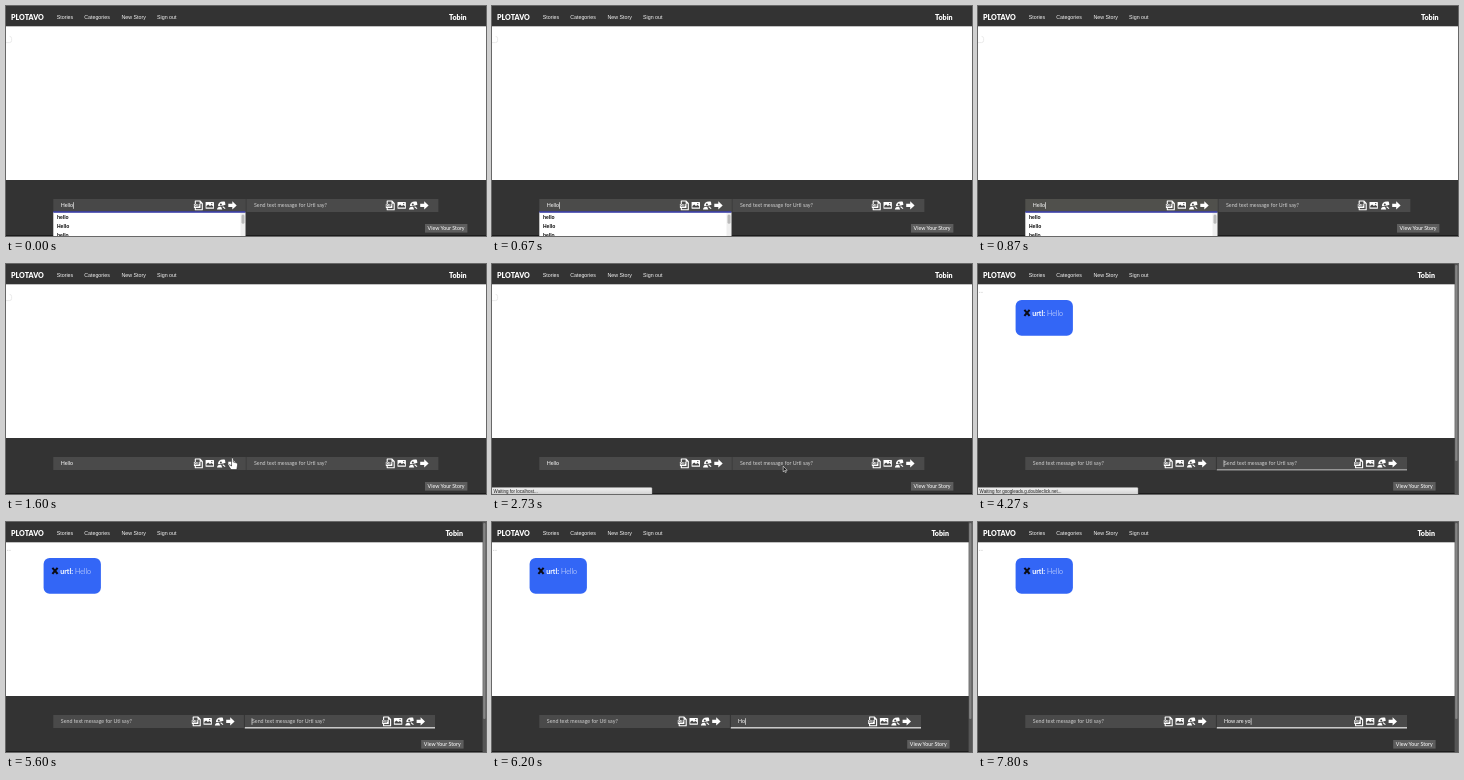
An HTML page that plays this animation: 480x230 px, repeating every 8 s.

```html
<!DOCTYPE html>
<html lang="en">
<head>
<meta charset="utf-8">
<title>Chat story</title>
<style>
html, body { margin: 0; width: 100%; height: 100%; overflow: hidden; background: #fff; }
svg { display: block; width: 480px; height: 230px; }
text { white-space: pre; }
.sans { font-family: "Liberation Sans", Arial, sans-serif; }
.lato { font-family: Lato, sans-serif; }
.nav { font-size: 5.3px; fill: #f4f4f4; }
.heavy { font-size: 7.1px; font-weight: 900; fill: #fff; }
.field { font-size: 5.3px; }
.row { font-size: 5px; font-weight: 700; fill: #111; }
</style>
</head>
<body>
<svg id="stage" viewBox="0 0 480 230" xmlns="http://www.w3.org/2000/svg">
  <defs>
    <linearGradient id="bar" x2="0" y2="1">
      <stop stop-color="#f2f2f2"/><stop offset="1" stop-color="#d0d0d0"/>
    </linearGradient>
    <g id="icons" fill="#fff">
      <path d="M-3-4.4H1.6L4-2V4.4H-3Z" fill="none" stroke="#fff" stroke-width="1.1" stroke-linejoin="round"/>
      <path d="M1.3-4.4V-1.7H4Z"/>
      <rect x="-4.4" y="-1.4" width="6.6" height="4" rx=".5"/>
      <text class="sans" x="-3.9" y="1.8" font-size="3.2" font-weight="700" fill="#333">GIF</text>
      <g transform="translate(11.5)">
        <rect x="-4.2" y="-3.4" width="8.4" height="6.8" rx=".6"/>
        <path d="M-3.4 2.2V.6L-1.6-1 .1.7 1.9-.4 3.4 1V2.2Z" fill="#444"/>
        <circle cx="2" cy="-1.8" r=".7" fill="#444"/>
      </g>
      <g transform="translate(23)">
        <path d="M-3.3.8C-3.4-2.5-1-4.3 3.6-3.7L4.2-.6 1.8.2Z"/>
        <path d="M-4.3 4.2C-4 1.5-2.4.9-.2 1.4L1 4.2Z"/>
        <circle cx="-.4" cy="-1" r="1" fill="#444"/>
        <path d="M1.4 1.2 3.8 3.2" stroke="#fff" stroke-width="1.2"/>
      </g>
      <path d="M30-1.6H34V-4.1L38.4 0 34 4.1V1.6H30Z"/>
    </g>
    <g id="list">
      <rect y="206" width="192" height="24" fill="#fff"/>
      <rect y="205.2" width="192" height="1.6" fill="#3b3fa8"/>
      <g class="sans row">
        <text x="3.7" y="213.4">hello</text>
        <text x="3.7" y="222.3">Hello</text>
        <text x="3.7" y="231.2">hello</text>
      </g>
      <rect x="187.2" y="207" width="4.8" height="23" fill="#efefef"/>
      <rect x="188.2" y="208.4" width="3" height="9.4" rx="1.5" fill="#b9b9b9"/>
    </g>
  </defs>

  <rect width="480" height="230" fill="#fff"/>
  <rect width="480" height="20.3" fill="#333"/>
  <rect y="174" width="480" height="56" fill="#333"/>
  <rect y="229" width="480" height="1" fill="#1c1c1c"/>
  <text class="lato heavy" x="5" y="13.8">PLOTAVO</text>
  <g class="sans nav">
    <text x="50.7" y="13.1">Stories</text>
    <text x="78.2" y="13.1">Categories</text>
    <text x="115.4" y="13.1">New Story</text>
    <text x="151" y="13.1">Sign out</text>
  </g>
  <text id="user" class="lato heavy" y="14">Tobin</text>

  <path id="box" d="M0 36.6H3.6Q5.6 36.6 5.6 34.6V32.4Q5.6 30.4 3.6 30.4" fill="none" stroke="#ddd" stroke-width=".6"/>
  <g id="bubble">
    <path d="M1 28.4H5" stroke="#bbb" stroke-width=".6" stroke-dasharray="1 .7"/>
    <rect x="37.6" y="36" width="57.3" height="35.8" rx="6" fill="#3366f6"/>
    <path d="M46.4 45.9 51.6 51.9M51.6 45.9 46.4 51.9" stroke="#0b0b14" stroke-width="2.1"/>
    <text class="lato" x="54.2" y="51.6" font-size="7.1" fill="#fff"><tspan font-weight="700">urtl:</tspan><tspan font-weight="300"> Hello</tspan></text>
  </g>

  <rect id="boxL" x="47.3" y="193" height="13" fill="#4a4a4a"/>
  <rect id="boxR" y="193" height="13" fill="#4a4a4a"/>
  <rect id="line" y="205.3" height="1.1" fill="#fff"/>
  <text id="textL" class="lato field" y="201.2" x="54.8"></text>
  <text id="textR" class="lato field" y="201.2"></text>
  <rect id="caret" y="196.2" width=".6" height="6.6" fill="#fff"/>
  <use id="iconsL" href="#icons"/>
  <use id="iconsR" href="#icons"/>
  <g id="button">
    <rect x="419" y="218" width="42.4" height="8.6" fill="#5d5d5d"/>
    <text class="lato field" x="421.6" y="224.1" fill="#fff">View Your Story</text>
  </g>
  <use id="menu" href="#list"/>

  <g id="status">
    <rect x="-1" y="223.6" width="161" height="7" rx="1" fill="url(#bar)" stroke="#999" stroke-width=".4"/>
    <text id="note" class="sans" x="1.6" y="228.5" font-size="4.5" fill="#222"></text>
  </g>
  <g id="scroll">
    <rect x="476.6" width="3.4" height="230" fill="#555"/>
    <rect x="477.2" y="1" width="2.3" height="196" rx="1.1" fill="#858585"/>
  </g>

  <g id="hand">
    <path d="M-.9 6V.6Q0-.6.9.6V4L4.6 5Q5.4 5.4 5.2 7L4.4 11.6H-1.4L-4 7.6Q-3.6 6.2-2.2 7L-.9 8Z" fill="#fff" stroke="#222" stroke-width=".6"/>
  </g>
  <path id="beam" d="M-1.3-4.6Q0-4.6 0-3.6Q0-4.6 1.3-4.6M0-3.6V3.6M-1.3 4.6Q0 4.6 0 3.6Q0 4.6 1.3 4.6" fill="none" stroke="#ccc" stroke-width=".6"/>
  <path id="arrow" d="M0 0V5.6L1.3 4.4 2.2 6.4 3.1 6 2.2 4.1H4Z" fill="#111" stroke="#fff" stroke-width=".55"/>
</svg>
<script>
const LOOP = 8000, RELOAD = 3530;
const el = {};
document.querySelectorAll("#stage [id]").forEach(n => el[n.id] = n);

const set = (n, attrs) => { for (const k in attrs) n.setAttribute(k, attrs[k]); };
const show = (n, on) => n.setAttribute("display", on ? "inline" : "none");
const at = (n, x, y) => n.setAttribute("transform", `translate(${x} ${y})`);
const within = (t, a, b) => t >= a && t < b;
const clamp = v => Math.max(0, Math.min(1, v));
const ease = v => v * v * (3 - 2 * v);
const ramp = (t, a, b) => ease(clamp((t - a) / (b - a)));
const mix = (a, b, p) => a + (b - a) * p;
const ask = who => `Send text message for ${who} say?`;

const reply = "How are yo";
const keys = [5930, 6200, 6330, 6530, 6800, 7130, 7200, 7270, 7670, 7800];

function write(n, str, color) {
  if (n.textContent !== str) n.textContent = str;
  n.setAttribute("fill", color);
}

function layout(t) {
  const done = t >= RELOAD;
  const right = done ? 238.8 : 240.4;
  show(el.bubble, done);
  show(el.scroll, done);
  show(el.box, !done);
  el.user.setAttribute("x", done ? 439.4 : 443);
  el.boxL.setAttribute("width", done ? 190.6 : 192.5);
  set(el.boxR, { x: right, width: done ? 190.2 : 192 });
  el.textR.setAttribute("x", done ? 246 : 248);
  at(el.iconsL, done ? 190.2 : 192.3, 199.4);
  at(el.iconsR, done ? 380.6 : 384.2, 199.4);
  at(el.button, done ? -3.8 : 0, 0);
}

function fields(t) {
  const done = t >= RELOAD;
  const tint = t < 1400 ? ramp(t, 530, 870) : 0;
  const g = Math.round(mix(72, 80, tint));
  el.boxL.setAttribute("fill", t < 1400 ? `rgb(${g},${g},${g - Math.round(4 * tint)})` : "#4a4a4a");
  write(el.textL, done ? ask("Utl") : "Hello", done ? "#d0d0d0" : "#fff");

  const typed = reply.slice(0, keys.filter(k => t >= k).length);
  write(el.textR, typed || ask("Urtl"), typed ? "#fff" : "#d0d0d0");

  const focus = ramp(t, 4000, 4200);
  show(el.line, focus > 0);
  set(el.line, { x: 238.8, width: 190.2, opacity: mix(0, .6, focus) + .4 * ramp(t, 4330, 4600) });

  const first = t < 1400;
  const blink = t >= 4070 && !within(t, 5130, 5600);
  show(el.caret, first || blink);
  const end = first ? 54.8 + el.textL.getComputedTextLength()
    : typed ? 246 + el.textR.getComputedTextLength() : 245.4;
  el.caret.setAttribute("x", end + .3);

  show(el.menu, first || within(t, 5930, 6200));
  at(el.menu, first ? 47.3 : 238, 0);
}

function status(t) {
  show(el.status, within(t, 1930, 4400));
  write(el.note, t < 3870 ? "Waiting for localhost..." : "Waiting for googleads.g.doubleclick.net...", "#222");
}

function pointer(t) {
  const p = ramp(t, 1800, 2470);
  const x = mix(226.4, 291.4, p), y = mix(194, 204, p);
  show(el.hand, t >= 1330 && x < 232);
  show(el.beam, (x >= 232 && t < 2730) || within(t, 3730, 4130));
  show(el.arrow, within(t, 2730, 3730));
  at(el.hand, x, y);
  if (t < 2730) at(el.beam, x, y);
  else at(el.beam, mix(266.8, 262, ramp(t, 3730, 4000)), mix(205, 200, ramp(t, 3730, 4000)));
  at(el.arrow, mix(291.2, 266.8, clamp((t - 2900) / 100)), 202.2);
}

function draw(t) {
  layout(t);
  fields(t);
  status(t);
  pointer(t);
}

const start = performance.now();
function tick() {
  draw((performance.now() - start) % LOOP);
  requestAnimationFrame(tick);
}
tick();
</script>
</body>
</html>
```
